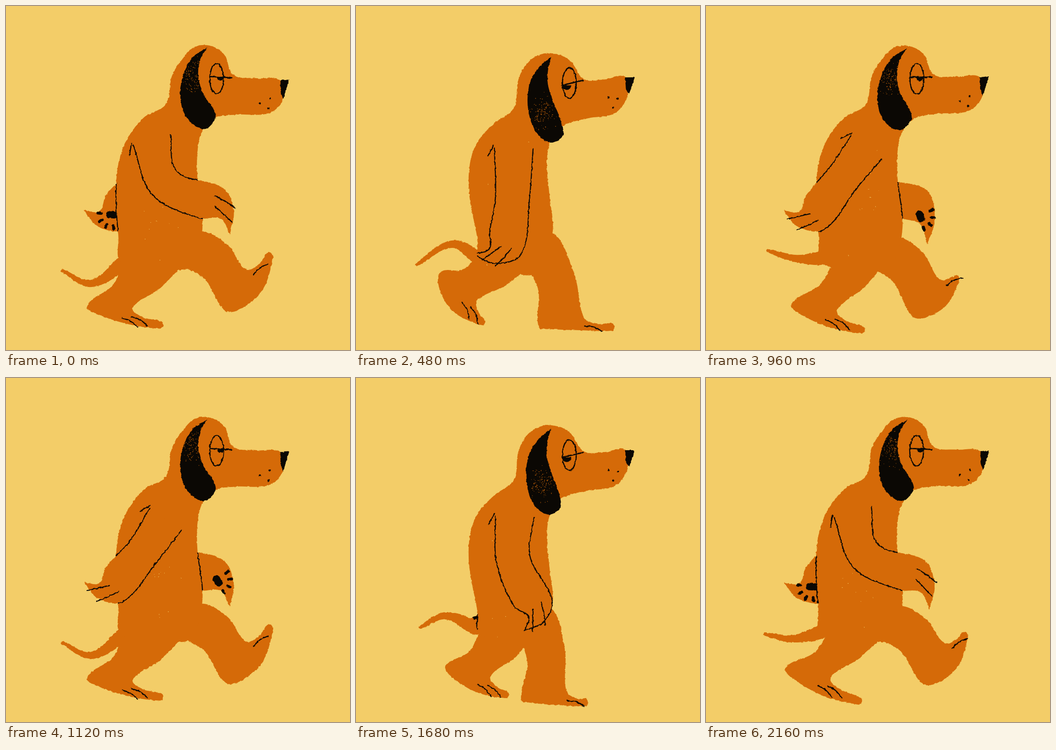
Write an HTML page that moves like this. It is 748 by 748 pixels and loops after 2240 ms.

```html
<!DOCTYPE html>
<html lang="en">
<head>
<meta charset="utf-8">
<title>Walking dog</title>
<style>
html, body { margin: 0; height: 100%; overflow: hidden; background: #f3cd68; }
svg { display: block; width: 100vw; height: 100vh; }
.fur { fill: #d56a08; }
.ink { fill: #0b0804; }
.line { fill: none; stroke: #0b0804; stroke-linecap: round; stroke-linejoin: round; }
</style>
</head>
<body>
<svg viewBox="0 0 748 748">
  <filter id="rough" filterUnits="userSpaceOnUse" x="0" y="0" width="748" height="748" color-interpolation-filters="sRGB">
    <feTurbulence id="noise" type="fractalNoise" baseFrequency=".16" numOctaves="2"/>
    <feDisplacementMap in="SourceGraphic" scale="4" xChannelSelector="R" yChannelSelector="G"/>
  </filter>
  <g id="dog" filter="url(#rough)"></g>
</svg>
<script>
const STEP = 80, CYCLE = 28, STRIDE = 14;
const numbers = text => text.match(/\d+/g).map(Number);
const pairs = v => v.reduce((out, x, i) => i % 2 ? out : [...out, [x, v[i + 1]]], []);

// Torso and head eased between the top and the bottom of the bounce.
const high = {
  body: '348,213 361,152 386,112 412,88 448,87 475,106 495,150 545,157 598,162 602,203 572,233 500,236 455,243 428,270 417,310 416,370 427,485 400,567 348,570 252,560 244,500 239,420 243,350 262,292 300,242',
  ear: '438,90 405,112 386,148 379,195 393,242 430,267 455,245 452,225 428,188 418,150 423,115',
  eye: '458,158', lid: '443,153 491,156', pupil: '466,155',
  nose: '597,161 616,160 603,203 597,186', dots: '552,212 574,201 571,223'
};
const low = {
  body: '343,222 353,160 374,122 407,104 441,106 467,121 496,160 540,161 587,157 590,198 562,235 504,245 447,262 423,294 415,343 421,415 427,495 390,580 358,584 270,557 264,505 247,415 247,347 264,296 300,256',
  ear: '424,111 397,133 376,167 370,220 385,273 416,297 443,284 443,258 427,212 415,170 417,135',
  eye: '464,168', lid: '448,173 494,162', pupil: '458,173',
  nose: '585,157 606,157 594,192 587,185', dots: '549,200 569,203 559,223'
};

// Moving points of a limb at chosen frames.
const tracks = { leg: [], arm: [], tail: [] };
const key = (name, frame, points) => tracks[name].push([frame, numbers(points)]);

// heel, toe
key('leg', 0, '476,662 577,537');
key('leg', 3, '466,666 602,573');
key('leg', 6, '397,697 562,697');
key('leg', 7, '359,699 505,704');
key('leg', 10, '247,700 381,706');
key('leg', 13, '173,630 339,704');
key('leg', 14, '176,652 342,694');
key('leg', 17, '203,595 321,690');
key('leg', 20, '185,578 279,692');
key('leg', 21, '195,626 332,691');
key('leg', 24, '366,698 497,656');
key('leg', 27, '470,664 566,554');

// shoulder, elbow, wrist, fingertip
key('arm', 0, '317,291 345,385 445,428 487,497');
key('arm', 6, '343,310 340,420 325,515 255,540');
key('arm', 10, '350,308 298,372 240,450 168,446');
key('arm', 14, '347,307 298,378 237,448 169,444');
key('arm', 17, '347,305 315,390 305,490 248,524');
key('arm', 21, '345,302 342,395 385,490 366,549');
key('arm', 24, '335,295 355,395 452,437 466,543');

// middle, tip
key('tail', 0, '187,603 121,575');
key('tail', 3, '180,571 125,560');
key('tail', 6, '208,518 131,563');
key('tail', 7, '195,517 138,543');
key('tail', 10, '205,527 140,492');
key('tail', 13, '190,567 127,557');

// Points of a track at a frame: monotone cubic between keys, wrapping round.
function at(name, frame, period = CYCLE) {
  const keys = tracks[name], n = keys.length, f = frame % period;
  const keyAt = i => {
    const lap = Math.floor(i / n), [t, v] = keys[i - lap * n];
    return [t + lap * period, v];
  };
  const i = keys.findLastIndex(k => k[0] <= f);
  const [a, b, c, d] = [i - 1, i, i + 1, i + 2].map(keyAt);
  const span = c[0] - b[0], u = (f - b[0]) / span;
  const slope = (p, q, j) => (q[1][j] - p[1][j]) / (q[0] - p[0]);
  const mean = (p, q) => p * q > 0 ? 2 * p * q / (p + q) : 0;
  return pairs(b[1].map((from, j) => {
    const s = slope(b, c, j), move = c[1][j] - from;
    const m0 = mean(slope(a, b, j), s) * span, m1 = mean(s, slope(c, d, j)) * span;
    return from + u * (m0 + u * (3 * move - 2 * m0 - m1 + u * (m0 + m1 - 2 * move)));
  }));
}

const wave = turns => Math.cos(2 * Math.PI * turns);
const mid = (p, q) => [(p[0] + q[0]) / 2, (p[1] + q[1]) / 2];

// Local axes from o towards t: (distance along, distance to the front side).
function axes(o, t) {
  const dx = t[0] - o[0], dy = t[1] - o[1], length = Math.hypot(dx, dy) || 1;
  const x = dx / length, y = dy / length;
  return { length, y, put: (a, s) => [o[0] + x * a + y * s, o[1] + y * a - x * s] };
}

// Moves p sideways from the direction a to b.
const aside = (p, a, b, s) => axes(p, [p[0] + b[0] - a[0], p[1] + b[1] - a[1]]).put(0, s);

// Smooth path through points; open ends stay sharp.
function curve(pts, closed) {
  const n = pts.length, count = closed ? n : n - 1;
  const pt = i => closed ? pts[(i + n) % n] : pts[Math.max(0, Math.min(n - 1, i))];
  let d = 'M' + pts[0];
  for (let i = 0; i < count; i++) {
    const p = pt(i), q = pt(i + 1), h = Math.hypot(q[0] - p[0], q[1] - p[1]) / 3;
    const from = axes(pt(i - 1), q), to = axes(p, pt(i + 2));
    const start = from.put(h, 0), end = to.put(-h, 0), o = pt(i - 1);
    d += `C${p[0] + start[0] - o[0]} ${p[1] + start[1] - o[1]} ${q[0] + end[0] - p[0]} ${q[1] + end[1] - p[1]} ${q}`;
  }
  return d;
}

function legParts(f) {
  const [heel, toe] = at('leg', f), foot = axes(heel, toe), L = foot.length;
  const swing = wave((f - 3) / CYCLE), sole = 8 + 35 * Math.abs(foot.y);
  const front = [400 + 25 * swing, 515 - 30 * swing], back = [320 + 65 * swing, 545];
  const instep = foot.put(98, 21);
  const knee = aside(mid(front, instep), front, instep, 17);
  const calf = aside(mid(back, heel), back, heel, 13);
  const shape = [front, knee, instep, foot.put(124, 6), foot.put(L - 6, 7), toe, foot.put(L - 5, -9),
    foot.put(L * .55, -sole), foot.put(L * .15, -sole * .7), heel, calf, back];
  const toeLine = (a, s) => [foot.put(a, s), foot.put(a + 20, s - 2), foot.put(a + 38, s - 11)];
  const lines = [toeLine(100, 1)];
  if (f >= 10 && f <= 22) lines.push(toeLine(80, -7));
  if (f >= 23 && f <= 25) lines.push([[308, 572], calf, foot.put(-10, 20)]);
  return { path: curve(shape, true), lines };
}

function armParts(f) {
  const [s, e, w, t] = at('arm', f), hand = axes(w, t), top = axes(s, e);
  const edge = (side, palm) => [aside(s, s, e, 42 * side), aside(e, s, w, 37 * side),
    aside(w, e, t, 42 * side), aside(mid(w, t), w, t, palm), t];
  const front = edge(1, 34), back = edge(-1, 0);
  const details = [
    [hand.put(12, 4), hand.put(60, 18)],
    [hand.put(-8, 16), hand.put(16, 30), hand.put(38, 40)],
    [top.put(-6, -44), top.put(18, -56)]
  ];
  const path = curve(back) + curve([...front].reverse()).replace('M', 'L') + 'Z';
  return { path, front, back, hand, details };
}

const fill = (d, cls = 'fur') => `<path class="${cls}" d="${d}"/>`;
const line = (pts, w = 2.3) => `<path class="line" stroke-width="${w}" d="${curve(pts)}"/>`;
const clip = (id, d) => `<clipPath id="${id}"><path d="${d}"/></clipPath>`;
const inside = (id, content) => `<g clip-path="url(#${id})">${content}</g>`;

// A large pad with four toes fanned round it.
function pads(hand) {
  const a = hand.length - 62, s = 6;
  let out = line([hand.put(a - 5, s), hand.put(a + 5, s)], 16);
  for (let i = 0; i < 4; i++) {
    const turn = 1.75 - i * .6;
    const ray = r => hand.put(a + r * Math.cos(turn), s + r * Math.sin(turn));
    out += line([ray(24), ray(31)], 6);
  }
  return out;
}

function tail(f) {
  const base = [266, 548], [m, tip] = at('tail', f, STRIDE);
  const edge = s => [aside(base, base, m, 12 * s), aside(m, base, tip, 8 * s), aside(tip, m, tip, 3 * s)];
  return curve([...edge(1), ...edge(-1).reverse()], true);
}

function specks(rand, n, x, y, w, h, color) {
  const spread = () => (rand() + rand() + rand()) / 1.5 - 1;
  let d = '';
  for (let i = 0; i < n; i++) d += `M${x + spread() * w} ${y + spread() * h}h${.6 + rand()}`;
  return `<path d="${d}" stroke="${color}" stroke-width="1.3"/>`;
}

function draw(f) {
  const turn = f / STRIDE, other = (f + STRIDE) % CYCLE;
  const drop = (1 - wave(turn + .04)) / 2;
  const nod = 5 * (1 - wave(2 * turn)), flap = 12 * wave(turn - .25);
  let seed = 71 + f * 977;
  const rand = () => (seed = seed * 16807 % 2147483647) / 2147483647;

  // The nod lifts the snout more towards its tip.
  const pose = name => {
    const end = numbers(low[name]);
    return pairs(numbers(high[name]).map((v, i) => v + (end[i] - v) * drop))
      .map(([x, y]) => [x, y - nod * Math.max(0, x - 440) / 160]);
  };

  const body = curve(pose('body'), true);
  const far = armParts(other), near = armParts(f), legs = [legParts(f), legParts(other)];
  let out = clip('torso', body) + clip('behind', far.path);
  out += fill(far.path) + pads(far.hand) + fill(tail(f));
  for (const leg of legs) out += fill(leg.path);
  out += fill(body) + specks(rand, 14, 335, 430, 70, 190, '#f3cd68');
  for (const leg of legs) for (const l of leg.lines) out += line(l);
  out += inside('behind', `<path class="line" stroke-width="2.3" d="${body}"/>`);

  // Arm contours show only where they cross the torso.
  out += fill(near.path) + inside('torso', line(near.back) + line(near.front));
  for (const l of near.details) out += line(l);

  const ear = pose('ear').map(([x, y]) => [x + flap * (y - 100) / 170, y]);
  const earPath = curve([...ear, ear[0]]);
  out += clip('ear', earPath) + fill(earPath, 'ink');
  out += inside('ear', specks(rand, 120, 405, 150 + 80 * drop, 38, 52, '#d56a08'));

  const [[ex, ey]] = pose('eye'), [[px, py]] = pose('pupil'), r = 7 + 3 * drop;
  out += `<ellipse class="line" stroke-width="2.6" cx="${ex}" cy="${ey}" rx="15" ry="33"/>`;
  out += fill(`M${px - r} ${py}A${r} ${r} 0 0 0 ${px + r} ${py}Z`, 'ink') + line(pose('lid'), 2.8);
  out += fill('M' + pose('nose').join('L') + 'Z', 'ink');
  for (const [x, y] of pose('dots')) out += `<circle class="ink" cx="${x}" cy="${y}" r="2.3"/>`;

  noise.setAttribute('seed', f + 1);
  dog.innerHTML = out;
}

const dog = document.getElementById('dog'), noise = document.getElementById('noise');
const start = performance.now();
let shown = -1;
function tick() {
  const f = Math.floor((performance.now() - start) / STEP) % CYCLE;
  if (f !== shown) draw(shown = f);
  requestAnimationFrame(tick);
}
tick();
</script>
</body>
</html>
```
